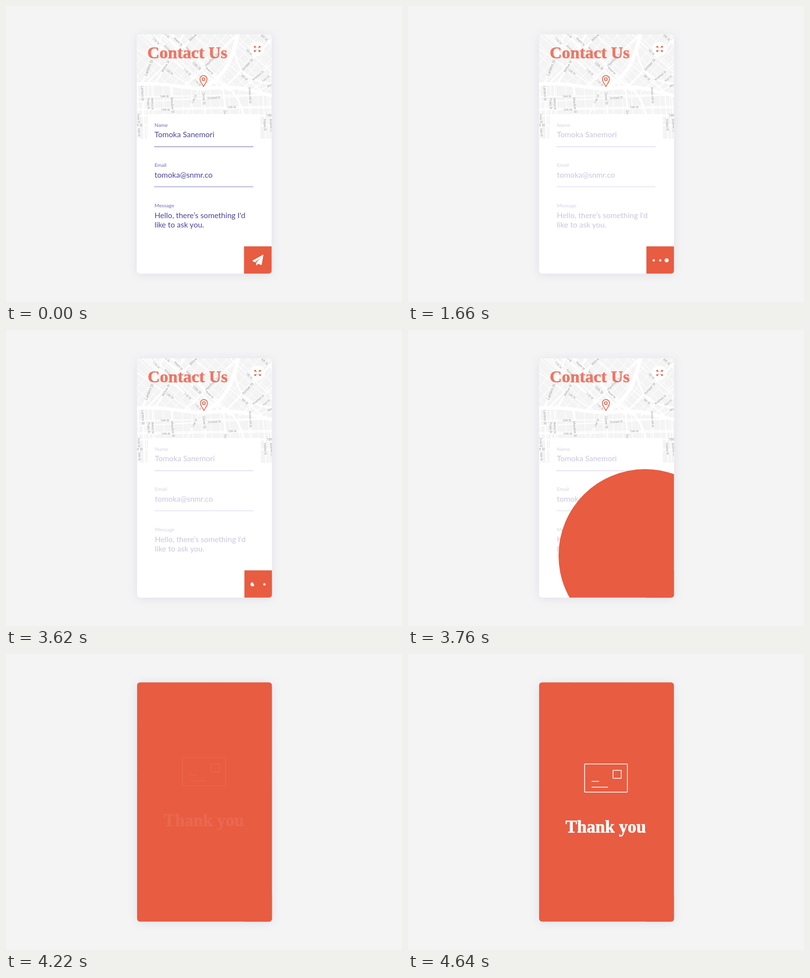
Animation, 800 px wide and 600 px high, one loop 6360 ms. Source, as an HTML page:

```html
<!DOCTYPE html>
<html lang="en">
<head>
<meta charset="utf-8">
<title>Contact form</title>
<style>
  html, body { margin: 0; width: 100%; height: 100%; overflow: hidden; background: #f4f4f5; }
  svg { display: block; width: 800px; height: 600px; }
  #card { filter: drop-shadow(0 2px 9px rgba(60, 60, 120, .11)); }
  #labels { font-family: Roboto, sans-serif; fill: #969696; text-anchor: middle; }
  #roads, #freeways { stroke: #fff; fill: none; }
  .serif { font-family: "Liberation Serif", serif; font-weight: bold; stroke-width: .7; }
  #title { font-size: 34px; fill: #ec6450; stroke: #ec6450; opacity: .87; }
  #form { font: 15.5px Lato, sans-serif; fill: #4a469c; }
  #form .label { font-size: 10.3px; fill: #716db3; }
  #form path { stroke: #7f7cbc; stroke-width: 1.2; }
  .line { fill: none; stroke: #e85c41; stroke-width: 1.5; }
  #thanks { fill: #fff; stroke: #fff; text-anchor: middle; }
  #thanks path, #thanks rect { fill: none; stroke-width: 1.5; }
</style>
</head>
<body>
<svg viewBox="0 0 800 600">
  <defs>
    <clipPath id="cardClip"><rect id="mask" y="57.5" width="272.5" height="485" rx="6"/></clipPath>
    <clipPath id="north"><path d="M255 50H545V180L264 158Z"/></clipPath>
    <clipPath id="south"><path d="M255 158L545 180V270H255Z"/></clipPath>
    <g id="arrow">
      <path d="M-6.5 -6h4.2l-4.2 4.2Z" fill="#e85c41" stroke="none"/>
      <path d="M-5.5 -5L-2.2 -2"/>
    </g>
  </defs>

  <rect id="card" y="57.5" width="272.5" height="485" rx="6" fill="#fff"/>
  <g clip-path="url(#cardClip)">
    <g id="content">
      <rect x="255" y="50" width="290" height="219" fill="#f4f4f4"/>
      <g id="roads">
        <g id="northRoads" clip-path="url(#north)"></g>
        <g id="southRoads" clip-path="url(#south)"></g>
      </g>
      <g id="freeways">
        <path stroke-width="7" d="M255 159C330 152 360 172 420 166S500 176 545 183"/>
        <path stroke-width="8" d="M390 167C440 152 458 110 470 50"/>
        <path stroke-width="4" d="M415 150C455 158 484 190 486 275M462 90C466 130 490 155 545 158"/>
      </g>
      <g id="labels"></g>
      <path fill="#fff" d="M286 272V222q0-3 3-3H511q3 0 3 3V272Z"/>

      <text class="serif" id="title" x="285.5" y="106">Contact Us</text>
      <path class="line" d="M399 163.2C396.5 158 391.8 153.5 391.8 148.2a7.2 7.2 0 0 1 14.4 0C406.200 153.5 401.5 158 399 163.2Z"/>
      <circle class="line" cx="399" cy="148.3" r="2.8"/>

      <circle cx="507.5" cy="87" r="14.5" fill="#fff"/>
      <g class="line" transform="translate(507.5 87)">
        <use href="#arrow"/>
        <use href="#arrow" transform="scale(-1 1)"/>
        <use href="#arrow" transform="scale(1 -1)"/>
        <use href="#arrow" transform="scale(-1 -1)"/>
      </g>

      <g id="form">
        <text class="label" x="300" y="244.5">Name</text>
        <text x="300" y="266">Tomoka Sanemori</text>
        <path d="M299.5 285.3h200M299.5 366.5h200"/>
        <text class="label" x="300" y="326">Email</text>
        <text x="300" y="347.5">tomoka@snmr.co</text>
        <text class="label" x="300" y="407.5">Message</text>
        <text x="300" y="429.5">Hello, there’s something I'd</text>
        <text x="300" y="448.5">like to ask you.</text>
      </g>

      <rect x="480.8" y="487.2" width="60" height="60" fill="#e85c41"/>
    </g>
    <path id="plane" fill="#fff" stroke="#fff" stroke-linejoin="round"
      d="M519.5 504.500L498 516.5L503 519.2L516.5 507.5L506 520.5V525.5L509.2 522L516 524.6Z"/>
    <g id="dots" fill="#fff">
      <circle cy="515.5"/><circle cy="515.5"/><circle cy="515.5"/>
    </g>
    <circle id="flood" fill="#e85c41"/>
    <g id="thanks">
      <rect x="356.7" y="222.7" width="86.6" height="57.4" rx="1.5"/>
      <rect x="414.3" y="235.7" width="16.5" height="16.2" rx=".5"/>
      <path d="M371 258.3h15M371 269.9h33"/>
      <text class="serif" x="399.5" y="362" font-size="35">Thank you</text>
    </g>
  </g>
</svg>

<script>
const $ = id => document.getElementById(id);
const clamp = v => Math.max(0, Math.min(1, v));

function set(el, attrs) {
  for (const k in attrs) el.setAttribute(k, attrs[k]);
}

function add(parent, tag, attrs, text = '') {
  const el = document.createElementNS('http://www.w3.org/2000/svg', tag);
  set(el, attrs);
  el.textContent = text;
  parent.append(el);
}

function road(x, y, angle, width) {
  add(y < 166 ? $('northRoads') : $('southRoads'), 'path',
    { d: 'M-400 0H400', 'stroke-width': width, transform: `translate(${x} ${y}) rotate(${angle})` });
}

// text, centre, angle, size
const streets = [
  ['11th St', 303, 71, 45], ['Maple St', 348, 72, 45], ['Acorn St', 328, 87, 45],
  ['Willow St', 380, 61, -45, 6.5], ['6th St', 522, 64, 43, 6.5], ['9th St', 324, 59, 45],
  ['Lantern St', 288, 125, -67, 7.5], ['Willow St', 322, 122, -60, 6.5],
  ['12th St', 330, 133, 35], ['11th St', 366, 134, 40], ['10th St', 385, 121, 43, 7],
  ['Reed St', 411, 131, 45], ['11th St', 387, 155, 43], ['Hawthorn St', 415, 109, -45, 6.5],
  ['Reed St', 371, 90, 43], ['7th St', 491, 93, 42, 6], ['Juniper St', 487, 119, -46, 7],
  ['8th St', 482, 145, 40], ['Riverbed St', 509, 141, -40], ['Fern St', 525, 147, -40],
  ['Mint', 533, 161, -25],
  ['Lantern St', 276, 177, 88, 6.5], ['Poppy St', 288, 198, 88], ['Walnut St', 296, 198, 88],
  ['14th St', 320, 183, -1], ['15th St', 322, 210, -1], ['Meadow St', 336.5, 201, 85, 6.5],
  ['Lilac St', 380, 188, -65], ['Clover St', 400, 187, 86, 6.5], ['Orchard St', 420, 186, -3],
  ['Amber Hill St', 493, 181, 87], ['15th St', 456, 205, -1], ['Qu', 443, 215, 85, 6.5],
  ['16th', 532, 222, 0, 6.5], ['Pebble St', 523, 241, 86], ['Bluebell St', 536, 242, 86],
  ['th St', 269, 242, 0, 6.5], ['Dune St', 268, 228, 88], ['Vale St', 269, 256, 88]
];

for (let i = 0; i < 16; i++) {
  road(270 + i * 22, 110, -50, 1);
  road(210 + i * 22, 110, 44, 1);
  road(262 + i * 19, 200, 87, 1.2);
}
for (const [text, x, y, angle, size = 5.6] of streets) {
  road(x, y, angle, size > 6 ? 3.4 : 2);
  add($('labels'), 'text',
    { transform: `translate(${x} ${y}) rotate(${angle})`, y: size * .36, 'font-size': size }, text);
}

function drawDots(t) {
  const p = (t - 1240) % 1200;
  const toMid = clamp((p + 2) / 20), toRight = clamp((p - 398) / 20), back = clamp((p - 780) / 260);
  const active = [1 - toMid + back, toMid - toRight, toRight - back];
  [...$('dots').children].forEach((dot, i) => {
    const a = active[i];
    set(dot, {
      cx: [496.5 + 1.5 * a, 509.5, 522 + .5 * a][i],
      r: 2.5 + 1.5 * a,
      opacity: .8 + .2 * a
    });
  });
  set($('dots'), { opacity: t < 1240 ? 0 : 1 });
}

function drawFlood(t) {
  const k = Math.max(0, t - 3600) / 160, s = .277 * k ** 1.33;
  set($('flood'), { cx: 509 - 108 * s, cy: 515 - 209 * s, r: 175 * k ** 1.48 });
}

function frame() {
  const t = Math.floor(performance.now() % 6360 / 20) * 20;
  const sent = clamp((t - 1240) / 420);
  const left = 264.1 + .7 * sent;
  set($('card'), { x: left });
  set($('mask'), { x: left });
  set($('content'), { transform: `translate(${.8 * sent} 0)` });
  set($('form'), { opacity: 1 - .7 * sent });
  set($('plane'), { opacity: 1 - clamp((t - 1232) / 160) });
  drawDots(t);
  drawFlood(t);
  const shown = Math.sin(clamp((t - 4200) / 440) * Math.PI / 2);
  set($('thanks'), { opacity: shown, transform: `translate(0 ${-14 * (1 - shown)})` });
  requestAnimationFrame(frame);
}
frame();
</script>
</body>
</html>
```
